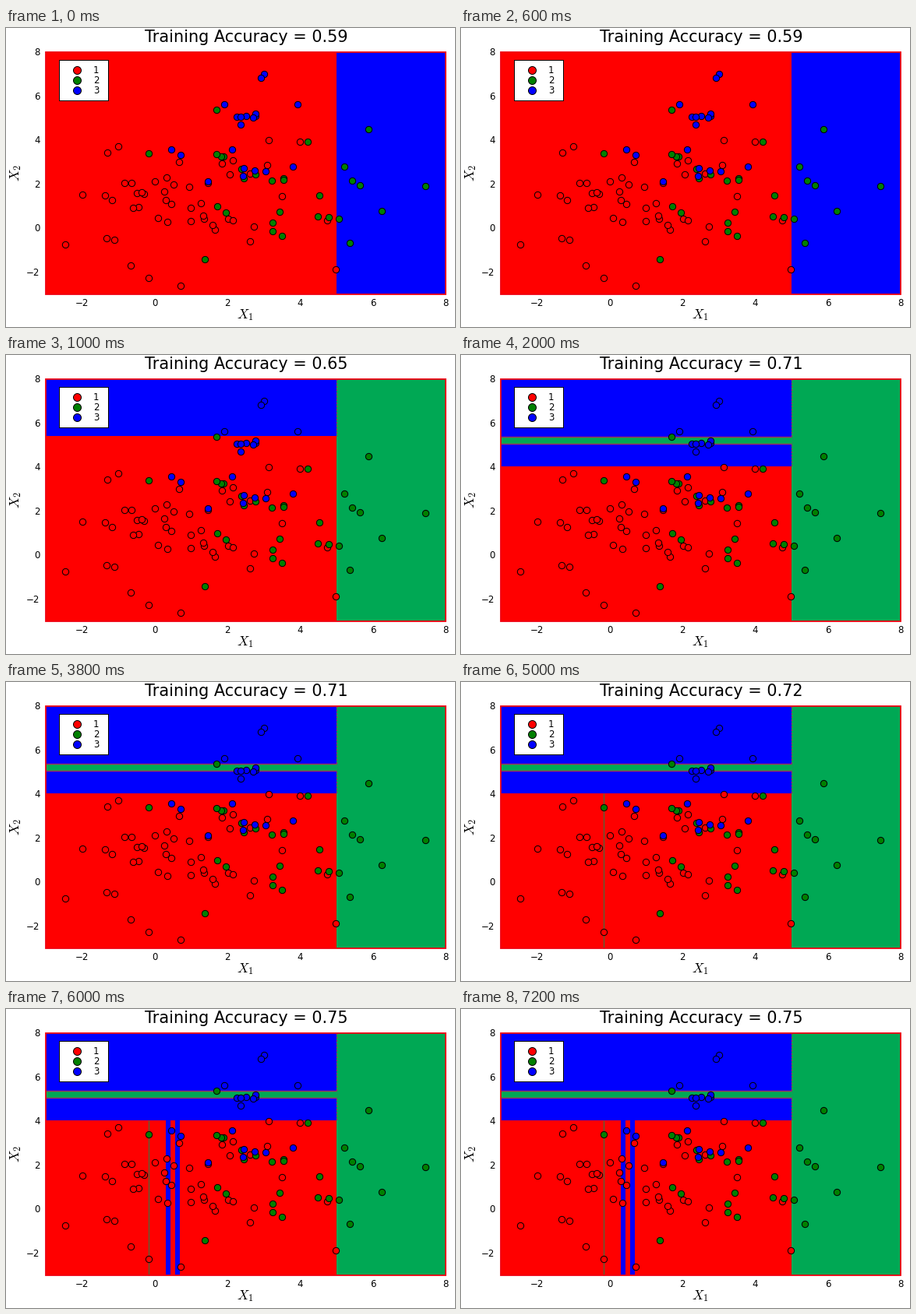
A matplotlib script for the animation above (8000 ms loop, 576 by 384 pixels).

```python
import matplotlib.pyplot as plt
import numpy as np
from matplotlib.animation import ArtistAnimation
from matplotlib.patches import Rectangle

W, H, DPI = 576, 384, 96
LEFT, TOP, RIGHT, BOTTOM = 51, 30.5, 564, 341.5
LOW, HIGH = -3, 8
SPLIT = 423.5
BAND_TOP, BAND_BOTTOM, FLOOR = 105, 113.5, 143
RED, GREEN, BLUE = "#ff0000", "#008000", "#0000ff"
FIELD_GREEN = "#00a854"
SEAM = "#a0305a"
DOTTED = (0, (1.5, 1.5))

plt.rcParams.update({"font.family": "DejaVu Sans", "mathtext.fontset": "cm"})

rng = np.random.default_rng(7)
fig = plt.figure(figsize=(W / DPI, H / DPI), dpi=DPI, facecolor="white")
ax = fig.add_axes([0, 0, 1, 1])
ax.set_xlim(0, W)
ax.set_ylim(H, 0)
ax.axis("off")


def pt(px):
    return px * 72 / DPI


def to_x(v):
    return LEFT + (v - LOW) * (RIGHT - LEFT) / (HIGH - LOW)


def to_y(v):
    return BOTTOM - (v - LOW) * (BOTTOM - TOP) / (HIGH - LOW)


def cloud(n, x0, x1, y0, y1):
    """Samples gathered around the middle of a box."""
    return rng.beta(2, 2, (n, 2)) * [x1 - x0, y1 - y0] + [x0, y0]


def text(x, y, s, px, **kw):
    kw = {"ha": "center", "va": "baseline", "color": "black", **kw}
    return ax.text(x, y, s, fontsize=pt(px), **kw)


def box(x0, y0, x1, y1, color, z=1):
    return ax.add_patch(Rectangle((x0, y0), x1 - x0, y1 - y0,
                                  facecolor=color, linewidth=0, zorder=z))


def outline(x0, y0, x1, y1, edge, width, fill, z):
    ax.add_patch(Rectangle((x0, y0), x1 - x0, y1 - y0, facecolor=fill,
                           edgecolor=edge, linewidth=pt(width), zorder=z))


def seam(x0, y0, x1, y1, color=SEAM, style="-"):
    return ax.plot([x0, x1], [y0, y1], color=color, lw=pt(1.4), ls=style,
                   zorder=2, solid_capstyle="butt", dash_capstyle="butt")[0]


def dots(x, y, color, size, z):
    ax.plot(x, y, "o", ms=pt(size), mfc=color, mec="black", mew=pt(1),
            zorder=z)


def samples(color, z, *groups):
    x, y = np.vstack(groups).T
    dots(to_x(x), to_y(y), color, 8.3, z)


def title(score):
    return text(308, 18.5, f"Training Accuracy = {score:.2f}", 20.7)


def right_side(color):
    return box(SPLIT, TOP, RIGHT, BOTTOM, color)


def cap(bottom):
    """Blue area from the top edge, with a dotted seam on its right."""
    return [right_side(FIELD_GREEN),
            box(LEFT, TOP, SPLIT, bottom, BLUE),
            seam(SPLIT, TOP, SPLIT, bottom, style=DOTTED)]


def bands():
    parts = cap(FLOOR) + [box(LEFT, BAND_TOP, SPLIT + 1, BAND_BOTTOM,
                              FIELD_GREEN, z=2)]
    return parts + [seam(LEFT, y, SPLIT, y) for y in (BAND_TOP, BAND_BOTTOM)]


def sliver():
    return [seam(182.5, FLOOR, 182.5, BOTTOM, color="#556438")]


def columns():
    return [box(x, FLOOR, x + 6, BOTTOM, BLUE) for x in (205, 217)]


# Parts that never change
box(LEFT, TOP, RIGHT, BOTTOM, RED, z=0)
outline(LEFT, TOP, RIGHT, BOTTOM, "#f00010", 1.8, "none", 3)

# Outlying samples are placed, the rest is scattered
samples(RED, 4,
        [(-2.47, -0.75), (-0.67, -1.7), (-0.17, -2.27), (0.72, -2.62),
         (4.98, -1.9), (4.75, 0.35), (4.0, 3.9), (3.13, 4.0), (-1, 3.7)],
        cloud(41, -2.5, 3.8, -1.2, 4.1))
samples(GREEN, 5,
        [(7.45, 1.9), (5.87, 4.47), (5.22, 2.8), (4.2, 3.9), (1.7, 5.38),
         (-0.17, 3.4), (1.38, -1.43), (5.37, -0.7), (6.25, 0.75)],
        cloud(3, 1.5, 2, 3.2, 3.6), cloud(18, 1, 6, -0.7, 3.2))
samples(BLUE, 6,
        [(3, 7), (2.92, 6.83), (1.9, 5.62), (3.93, 5.63), (3.8, 2.78),
         (1.47, 2.12), (0.45, 3.57), (0.7, 3.3)],
        cloud(7, 2, 2.9, 4.4, 5.7), cloud(5, 1.8, 3.5, 2.2, 4))

for v in range(-2, 9, 2):
    label = str(v).replace("-", "\u2212")
    text(to_x(v), 357, label, 11.8)
    text(43.5, to_y(v) + 4.5, label, 11.8, ha="right")
text(306.5, 369, "$X_1$", 17.3, va="center")
text(12.5, 186.5, "$X_2$", 17.3, va="center", rotation=90)

outline(68, 41, 130.5, 93, "black", 1, "white", 7)
for i, color in enumerate((RED, GREEN, BLUE)):
    y = 54 + 13 * i
    dots([90.5], [y], color, 10, 8)
    text(115.5, y + 4.3, str(i + 1), 11.8, zorder=8)

# Each stage: its artists and how many seconds it stays
stages = [
    ([right_side(BLUE), title(0.59)], 1),
    (cap(103.5) + [title(0.65)], 1),
    (bands() + [title(0.71)], 3),
    (bands() + sliver() + [title(0.72)], 1),
    (bands() + sliver() + columns() + [title(0.75)], 2),
]
frames = [parts for parts, seconds in stages for _ in range(seconds)]

anim = ArtistAnimation(fig, frames, interval=1000, repeat=True,
                       repeat_delay=0, blit=False)
plt.show()
```
